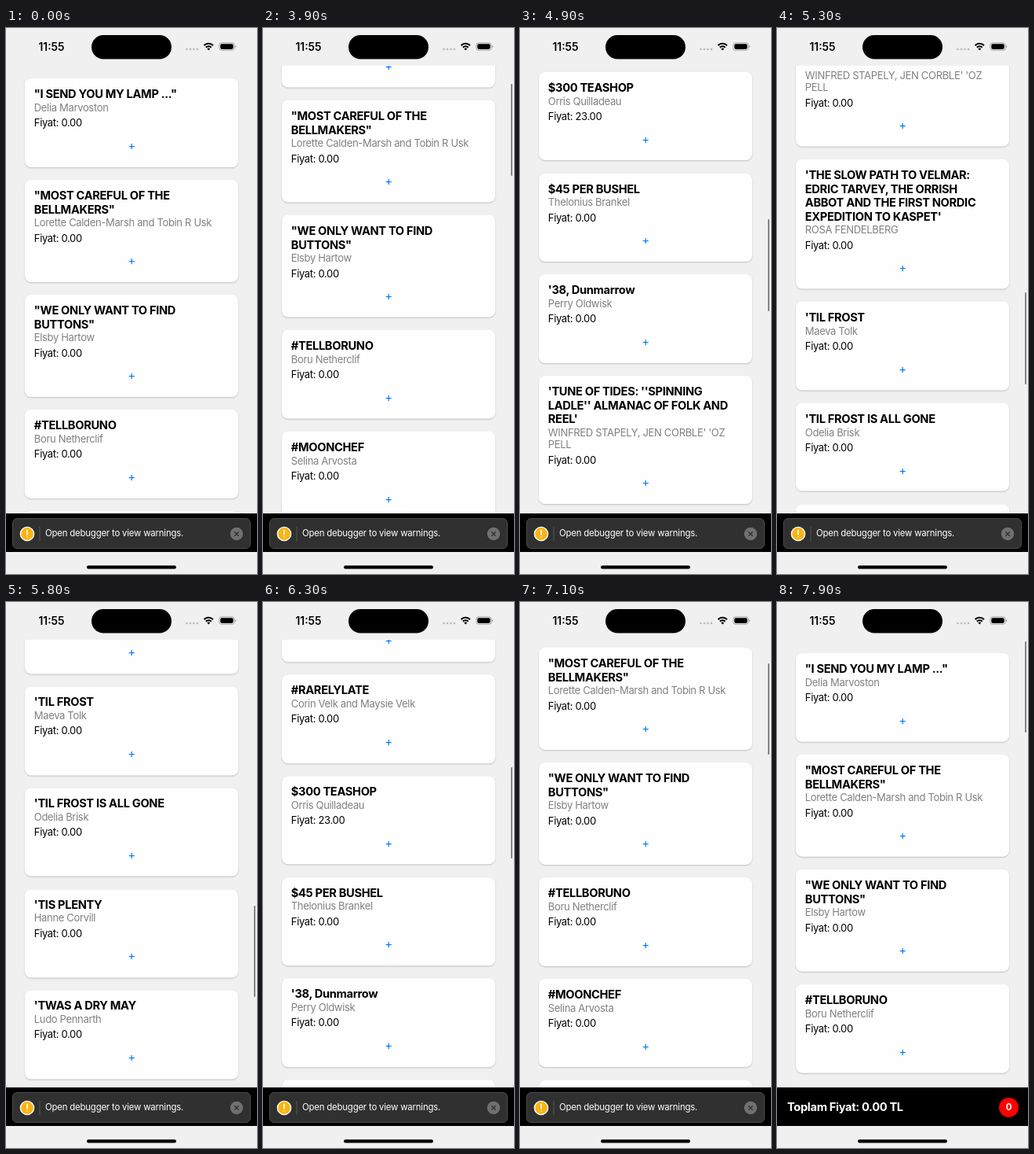
These frames come from a looping animation (320 by 694 pixels, 8 s). An HTML page:

```html
<!DOCTYPE html>
<html lang="tr">
<head>
<meta charset="utf-8">
<title>Book list</title>
<style>
html, body { margin: 0; width: 100%; height: 100%; overflow: hidden; }
body { position: relative; background: #f0f0f0; color: #000; font: 13.03px/15.5px Inter, sans-serif; letter-spacing: -.026em; }
svg, #view, #list, #thumb, #footer, #toast, .abs { position: absolute; }
svg { left: 0; top: 0; }
#view { left: 0; top: 48px; width: 320px; height: 569px; overflow: hidden; }
#list { left: 23.6px; top: 16.2px; width: 272.8px; }
.card { box-sizing: border-box; margin-bottom: 16.2px; padding: 12.2px 12.2px 5.8px; border-radius: 8px;
  background: #fefefe; box-shadow: 0 1px 2px rgba(0, 0, 0, .2); white-space: pre; }
.title { font-size: 14.66px; font-weight: 700; line-height: 17.5px; }
.author { color: #808080; }
.price { margin-top: 4px; }
.add { color: #007aff; font-size: 15px; line-height: 42px; text-align: center; }
#thumb { left: 315.6px; width: 2.5px; border-radius: 2px; background: rgba(0, 0, 0, .45); }
#footer { left: 0; top: 617px; width: 320px; height: 49px; background: #000; color: #fff; font-weight: 700; }
#total { left: 13px; top: 16px; font-size: 14.66px; line-height: 18px; white-space: pre; }
#count { left: 283px; top: 12.5px; width: 25px; height: 25px; border-radius: 50%; background: #f00;
  font-size: 11.4px; line-height: 25px; text-align: center; }
#toast { left: 8px; top: 6px; width: 304px; height: 39px; box-sizing: border-box; border: 1px solid #4a4a4a;
  border-radius: 6px; background: #303030; font-size: 11.4px; font-weight: 400; letter-spacing: -.017em; }
#toast span { left: 41px; top: 10.5px; white-space: pre; }
#clock { left: 28px; top: 15px; width: 60px; font-size: 13.8px; font-weight: 600; line-height: 18px;
  letter-spacing: 0; text-align: center; }
</style>
</head>
<body>
<div id="view"><div id="list"></div></div>
<div id="thumb"></div>
<div id="clock" class="abs">11:55</div>
<svg width="320" height="694" viewBox="0 0 320 694">
  <rect x="109" y="9" width="102" height="30.5" rx="15.2"/>
  <path d="M230.5 27h14" stroke="#b8b8b8" stroke-width="2.6" stroke-linecap="round" stroke-dasharray="0 4.5"/>
  <path d="M252.6 22.2a8 8 0 0 1 11.4 0M254.9 24.7a4.8 4.8 0 0 1 6.8 0" fill="none" stroke="#000" stroke-width="2"/>
  <path d="M256.4 26.4a2.8 2.8 0 0 1 3.8 0L258.3 28.4Z"/>
  <rect x="271.9" y="18.9" width="19.2" height="9.4" rx="3" fill="none" stroke="#999" stroke-width=".9"/>
  <rect x="273.3" y="20.3" width="16.4" height="6.6" rx="1.8"/>
  <path d="M292.2 22v3.2q1.2-.5 1.2-1.6t-1.2-1.6" fill="#999"/>
  <rect x="103" y="683.3" width="114" height="4.2" rx="2.1"/>
</svg>
<div id="footer">
  <div id="total" class="abs">Toplam Fiyat: 0.00 TL</div>
  <div id="count" class="abs">0</div>
  <div id="toast">
    <svg width="302" height="37" viewBox="9 624 302 37">
      <circle cx="27" cy="643" r="8.6" fill="#fab414" stroke="#fff" stroke-width="1.4"/>
      <path d="M27 638.3v5.6M27 646.7v.1" stroke="#fff" stroke-width="1.6" stroke-linecap="round"/>
      <path d="M43 634v18" stroke="#555"/>
      <circle cx="294" cy="643" r="8.2" fill="#707070"/>
      <path d="M291.3 640.3l5.4 5.4m0-5.4l-5.4 5.4" stroke="#303030" stroke-width="1.3"/>
    </svg>
    <span class="abs">Open debugger to view warnings.</span>
  </div>
</div>
<script>
const LOOP = 8000, STEP = 100, SCROLL_START = 3900, TOAST_END = 7700;

const books = [
  ['"I SEND YOU MY LAMP ..."', 'Delia Marvoston'],
  ['"MOST CAREFUL OF THE\nBELLMAKERS"', 'Lorette Calden-Marsh and Tobin R Usk'],
  ['"WE ONLY WANT TO FIND\nBUTTONS"', 'Elsby Hartow'],
  ['#TELLBORUNO', 'Boru Netherclif'],
  ['#MOONCHEF', 'Selina Arvosta'],
  ['#LATELUNCH', 'Nerys Polwick'],
  ['#RARELYLATE', 'Corin Velk and Maysie Velk'],
  ['$300 TEASHOP', 'Orris Quilladeau', '23.00'],
  ['$45 PER BUSHEL', 'Thelonius Brankel'],
  ["'38, Dunmarrow", 'Perry Oldwisk'],
  ["'TUNE OF TIDES: ''SPINNING\nLADLE'' ALMANAC OF FOLK AND\nREEL'", "WINFRED STAPELY, JEN CORBLE' 'OZ\nPELL"],
  ["'THE SLOW PATH TO VELMAR:\nEDRIC TARVEY, THE ORRISH\nABBOT AND THE FIRST NORDIC\nEXPEDITION TO KASPET'", 'ROSA FENDELBERG'],
  ["'TIL FROST", 'Maeva Tolk'],
  ["'TIL FROST IS ALL GONE", 'Odelia Brisk'],
  ["'TIS PLENTY", 'Hanne Corvill'],
  ["'TWAS A DRY MAY", 'Ludo Pennarth'],
  ['(UN)BUTTERED', 'Isolde Framley']
];

// Each flick coasts to a stop: start ms, start offset, distance in px
const GLIDE = 514;
const flicks = [
  [SCROLL_START, 101.5, 983],
  [4900, 944, 840.4],
  [5921, 1668, -1704.9]
];

const $ = id => document.getElementById(id);

function addElement(parent, className, text = '') {
  const el = document.createElement('div');
  el.className = className;
  el.textContent = text;
  return parent.appendChild(el);
}

for (const [title, author, price = '0.00'] of books) {
  const card = addElement($('list'), 'card');
  addElement(card, 'title', title);
  addElement(card, 'author', author);
  addElement(card, 'price', 'Fiyat: ' + price);
  addElement(card, 'add', '+');
}

function scrollAt(t) {
  const flick = flicks.filter(([start]) => start <= t).pop();
  if (!flick) return 0;
  const [start, from, distance] = flick;
  return from + distance * (1 - Math.exp((start - t) / GLIDE));
}

function draw(now) {
  const t = Math.floor(now % LOOP / STEP) * STEP;
  const y = scrollAt(t);
  $('list').style.transform = `translateY(${-y}px)`;
  $('thumb').style.display = t < SCROLL_START ? 'none' : '';
  $('thumb').style.top = 50.3 + .2046 * Math.max(y, 0) + 'px';
  $('thumb').style.height = 116.5 + Math.min(y, 0) + 'px';
  const toastOn = t < TOAST_END;
  $('toast').style.display = toastOn ? '' : 'none';
  $('total').style.display = $('count').style.display = toastOn ? 'none' : '';
}

const start = performance.now();
function tick() {
  draw(performance.now() - start);
  requestAnimationFrame(tick);
}
tick();
</script>
</body>
</html>
```
